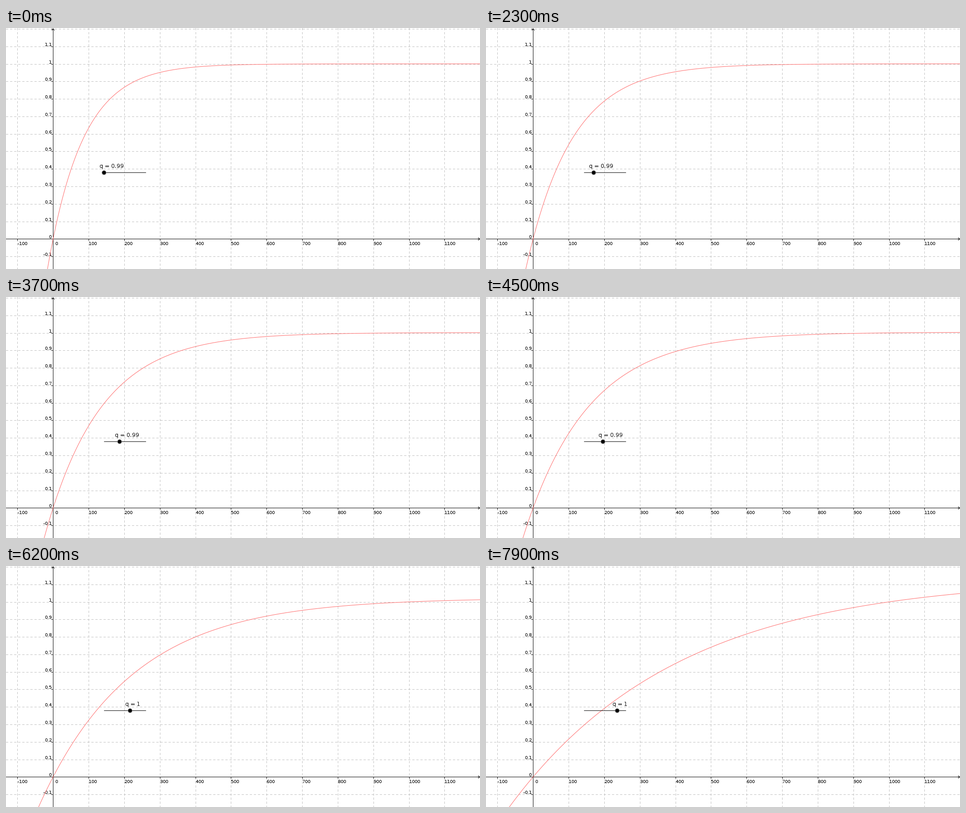
These frames come from a looping animation (1050x534 px, 8000 ms). A matplotlib script:

```python
import math

import numpy as np
import matplotlib.pyplot as plt
from matplotlib.animation import FuncAnimation
from matplotlib.patches import Circle

W, H, DPI = 1050, 534, 100
PX = 72 / DPI                    # one pixel in points
X0, Y0 = 104.3, 467.4            # graph zero on the stage
SX, SY = 0.7883, 387.9           # pixels per unit
FRAMES, INTERVAL = 80, 100
Q_MIN, Q_MAX, Q_STEP = 0.99, 1.0, 0.0001
SLIDER_X0, SLIDER_X1, SLIDER_Y = 217.2, 310.2, 320.5

plt.rcParams["font.family"] = "DejaVu Sans"
plt.rcParams["toolbar"] = "None"
# whole-pixel glyph advances
plt.rcParams["text.hinting"] = "native"
plt.rcParams["text.hinting_factor"] = 1

fig = plt.figure(figsize=(W / DPI, H / DPI), dpi=DPI, facecolor="white")
ax = fig.add_axes([0, 0, 1, 1])
ax.set_xlim(0, W)
ax.set_ylim(H, 0)
ax.axis("off")


def line(xs, ys, color="black", z=2, **kw):
    return ax.plot(xs, ys, color=color, lw=PX, zorder=z, snap=False,
                   solid_capstyle="butt", **kw)[0]


def label(x, y, text, size=10, z=3, **kw):
    return ax.text(x, y, text, fontsize=size * PX, color="black",
                   va="baseline", zorder=z, **kw)


def col(x):
    """Centre of the pixel column nearest to graph x."""
    return math.floor(X0 + x * SX + 0.5) + 0.5


def row(y):
    """Centre of the pixel row nearest to graph y."""
    return math.floor(Y0 - y * SY + 0.5) + 0.5


def draw_grid():
    style = dict(color="#c0c0c0", z=1, dashes=(5, 4))
    for x in range(-100, 1101, 100):
        c = col(x)
        if x:
            line([c, c], [0, H], **style)
            line([c, c], [row(0), row(0) + 4])
        label(c - 0.5 + (0 if x else 5), 481, str(x))
    for k in range(-1, 13):
        r = row(k / 10)
        if k:
            line([0, W], [r, r], **style)
            line([col(0) - 4, col(0)], [r, r])
        if k < 12:
            label(col(0) - 3.5, r - 1.5, f"{k / 10:g}", ha="right")


def draw_axes():
    cx, cy = col(0), row(0)
    line([cx, cx], [1, H])
    line([0, W], [cy, cy])
    line([cx - 3, cx, cx + 3], [5.5, 1.5, 5.5])
    line([W - 4.5, W - 0.5, W - 4.5], [cy - 3, cy, cy + 3])


draw_grid()
draw_axes()

xs = np.linspace(-135, 1202, 900)
curve = line(X0 + xs * SX, xs * 0, color="#ff6666", z=4)

line([SLIDER_X0, SLIDER_X1], [SLIDER_Y, SLIDER_Y], z=5)
halo = ax.add_patch(Circle((0, SLIDER_Y), 5.1, fc="#808080", ec="none", zorder=6))
knob = ax.add_patch(Circle((0, SLIDER_Y), 4, fc="black", ec="none", zorder=7))
caption = label(0, 310, "", size=12, z=8)


def update(i):
    q = Q_MIN + i * Q_STEP
    curve.set_ydata(Y0 - SY * (1 - q ** xs) / (1 - q ** 1000))
    x = SLIDER_X0 + (SLIDER_X1 - SLIDER_X0) * (q - Q_MIN) / (Q_MAX - Q_MIN)
    halo.center = knob.center = (x, SLIDER_Y)
    caption.set_x(x - 10.5)
    caption.set_text("q = 1" if i >= 50 else "q = 0.99")
    return curve, halo, knob, caption


anim = FuncAnimation(fig, update, frames=FRAMES, interval=INTERVAL,
                     repeat=True, repeat_delay=0, blit=False)
plt.show()
```
